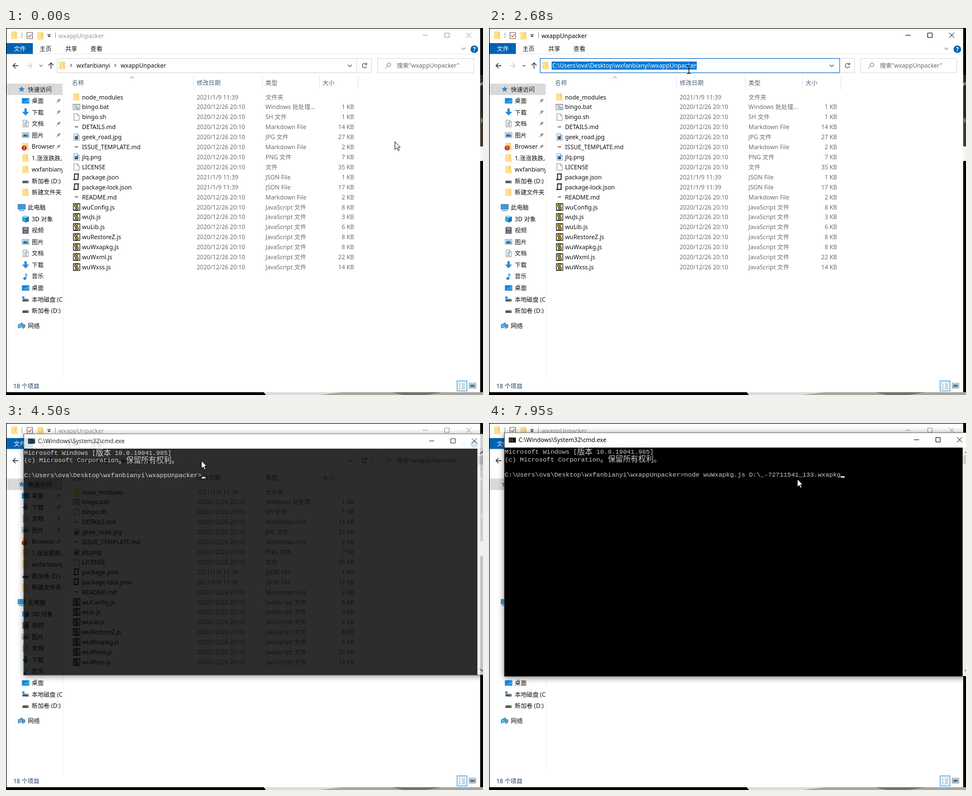
An HTML page that plays this animation: 853 px wide and 657 px high, repeating every 7.99 s.

```html
<!DOCTYPE html>
<html lang="zh-CN">
<head>
<meta charset="utf-8">
<title>wxappUnpacker</title>
<style>
  html, body { margin: 0; width: 100%; height: 100%; overflow: hidden; background: #000; }
  svg { display: block; }
  text { font: 10.65px "Noto Sans", "Noto Sans CJK SC", "Noto Sans CJK", sans-serif; }
  .con text { font: 11.38px "Liberation Mono", "Noto Sans CJK SC", monospace; }
  .con .wide { font: 13.66px "Noto Sans CJK SC", "Noto Sans CJK", sans-serif; }
  #shadow { filter: drop-shadow(0 2px 6px rgba(0, 0, 0, .55)); }
</style>
</head>
<body>
<svg id="stage" width="853" height="657" viewBox="0 0 853 657"></svg>
<script>
const LOOP = 7990;
const CELL = 6.83;
const INK = '#111', GREY = '#6d6d6d', BLUE = '#0063b1';
const HOME = String.raw`C:\Users\ova\Desktop\wxfanbianyi\wxappUnpacker`;
const SHELL = String.raw`C:\Windows\System32\cmd.exe`;
const COMMAND = String.raw`node wuWxapkg.js D:\_-72711541_133.wxapkg`;

// Markup helpers
const text = (x, y, s, fill = INK, more = '') => `<text x="${x}" y="${y}" fill="${fill}" ${more}>${s}</text>`;
const rect = (x, y, w, h, fill, more = '') => `<rect x="${x}" y="${y}" width="${w}" height="${h}" fill="${fill}" ${more}/>`;
const stroke = (d, color = '#555', w = 1) => `<path d="${d}" fill="none" stroke="${color}" stroke-width="${w}"/>`;
const fill = (d, color) => `<path d="${d}" fill="${color}"/>`;
const dot = (x, y, r, color) => `<circle cx="${x}" cy="${y}" r="${r}" fill="${color}"/>`;
const group = (id, body, more = '') => `<g id="${id}" ${more}>${body}</g>`;
const at = (x, y, body) => `<g transform="translate(${x} ${y})">${body}</g>`;
const controls = (x, y, gap, color) =>
  stroke(`M${x - 4.5} ${y}h9M${x + gap - 4} ${y - 4}h8v8h-8zM${x + 2 * gap - 4.5} ${y - 4.5}l9 9m0-9l-9 9`, color);

// Icons, each centred on 0,0
const page = fill('M-4.5-6.5h6.5l3 3v10h-9.5z', '#fff') + stroke('M-4.5-6h6l3.5 3.5v8.5h-9.5zM1.5-6v3.5h3.5', '#8a8a8a', .9);
const folder = rect(-5.5, -6.5, 10, 13, '#f3cf70') + fill('M-5.5-6.5h7v9h4.5v4h-11.5z', '#ffe08d');
const drive = rect(-5.5, 0, 11, 4, '#4b4f52') + fill('M-4-1.5h8l1.5 1.5h-11z', '#b9bdc0') + rect(2.5, 1.5, 2, 1, '#9fe07a');
const icons = {
  page, folder, drive,
  bat: rect(-6, -5, 12, 10, '#fff', 'stroke="#7b858d"') + rect(-6, -5, 12, 2, '#a6b4c0') +
    stroke('M-3 .5a2 2 0 1 0 4 0a2 2 0 1 0-4 0M1 2a1.6 1.6 0 1 0 3.2 0a1.6 1.6 0 1 0-3.2 0', '#7b858d', 1.1),
  md: rect(-3, -1.5, 6, 2.5, '#8d8d8d'),
  img: page + rect(-3, -2, 6, 6, '#3b79b5') + fill('M-3 4l3-3.5l3 3.5z', '#1c3f5c'),
  json: stroke('M-3.5 4V-5.5h8M3 -5.5V4.500M-6 4.500h7a2 2 0 0 0 2-2', '#222', 1.7),
  js: rect(-5.5, -6, 11.5, 12, '#fff', 'stroke="#111" stroke-width="1.2"') +
    stroke('M3-3.500C-1-6-4-2 0 0S1 5-3 3.500', '#111', 4) + stroke('M3-3.500C-1-6-4-2 0 0S1 5-3 3.500', '#f0d33c', 1.6),
  star: fill('M0-5.500l1.500 3.500 4 .3-3 2.600 1 4-3.500-2.200-3.500 2.200 1-4-3-2.600 4-.3z', '#2f86cf'),
  desk: rect(-6.5, -4.5, 13, 9, '#0f86dc') + fill('M-6.500 4.500L6.500-4.500V4.500z', '#31a4f1') + stroke('M-6.500 4.500h13', '#0b5a99'),
  down: fill('M-2-6.500h4v6h4.200L0 6.500L-6.200-.5H-2z', '#2b88d8'),
  doc: page + stroke('M-2.500-2h5M-2.500 0h5M-2.500 2h5M-2.500 4h5', '#5b86a8', .9),
  pic: rect(-6, -4.5, 12, 9, '#fff', 'stroke="#8a9aa6"') + rect(-4.5, -3, 9, 6, '#6fb3e0') + fill('M-4.500 3v-2l3-2l3 2l3-1v3z', '#2f5f86'),
  alert: folder + dot(-2.5, 2.5, 4.5, '#c42b1c') + rect(-3.1, -.5, 1.2, 3.6, '#fff') + rect(-3.1, 4, 1.2, 1.2, '#fff'),
  pc: rect(-6.5, -5.5, 13, 8.5, '#2f9de4', 'stroke="#5d7486" stroke-width=".9"') + stroke('M-5 5.500h10', '#3f7fb0', 1.3),
  cube: fill('M-6-4l5-2 7 2v8l-6 2.500-6-2.500z', '#31a6d8') + fill('M0-2l6-2v8L0 6.500z', '#1c78ab') + fill('M-6-4l5-2 7 2L0-2z', '#8fd8f2'),
  film: rect(-5.5, -6, 11, 12, '#39414a') + rect(-3, -5, 6, 4.5, '#7aa7d8') + rect(-3, .7, 6, 4.5, '#95846e') +
    stroke('M-4.300-5.500V6M4.300-5.500V6', '#ddd', '1" stroke-dasharray="1.3 1.3'),
  note: fill('M0-6.500c1 3 5 3.500 3.500 7.500c0-3-1.500-3.500-2.200-3.500V4a2.700 2.300 0 1 1-1.300-2z', '#1683d8'),
  sys: drive + rect(-6, -5, 4, 4, '#1591e0'),
  net: fill('M-6.500-2l8-4v8l-8 3z', '#2288cc') + fill('M1-4l5.500 2v5L1 6z', '#6a8fad') + fill('M-5-1l5-2.300v4.500l-5 2z', '#65bdf0'),
  pin: fill('M1-4l3 3-1.500.5-1.500 2 0 2-4.500-4.500 2 0 2-1.500z', '#8b9299') + stroke('M-1.500 1.500l-3 3', '#8b9299'),
};
const icon = (name, x, y) => at(x, y, icons[name]);

// Files: icon, name, type, size in KB, is recent
const MD = 'Markdown File', JS = 'JavaScript 文件';
const files = [
  ['folder', 'node_modules', '文件夹', 0, 1], ['bat', 'bingo.bat', 'Windows 批处理...', 1],
  ['page', 'bingo.sh', 'SH 文件', 1], ['md', 'DETAILS.md', MD, 14],
  ['img', 'geek_road.jpg', 'JPG 文件', 27], ['md', 'ISSUE_TEMPLATE.md', MD, 2],
  ['img', 'jlq.png', 'PNG 文件', 7], ['page', 'LICENSE', '文件', 35],
  ['json', 'package.json', 'JSON File', 1, 1], ['json', 'package-lock.json', 'JSON File', 17, 1],
  ['md', 'README.md', MD, 2],
  ...[['Config', 8], ['Js', 3], ['Lib', 6], ['RestoreZ', 8], ['Wxapkg', 8], ['Wxml', 22], ['Wxss', 14]]
    .map(([n, kb]) => ['js', `wu${n}.js`, JS, kb]),
];
const fileRow = ([kind, name, type, kb, recent], i) => {
  const y = 123.5 + i * 17.91, base = y + 4;
  return icon(kind, 126, y) + text(136, base, name) +
    text(341, base, recent ? '2021/1/9 11:39' : '2020/12/26 20:10', GREY) + text(464, base, type, GREY) +
    (kb ? text(622.5, base, kb + ' KB', GREY, 'text-anchor="end"') : '');
};

// Sidebar: blocks of a first row's y and its entries; the first entry is the parent
const places = [
  [109.5, 'star 快速访问|desk 桌面|down 下载|doc 文档|pic 图片|alert Browser|folder 1.涨涨跌跌,|folder wxfanbianyi|drive 新加卷 (D:)|folder 新建文件夹'],
  [321.3, 'pc 此电脑|cube 3D 对象|film 视频|pic 图片|doc 文档|down 下载|note 音乐|desk 桌面|sys 本地磁盘 (C:)|drive 新加卷 (D:)'],
  [533, 'net 网络'],
];
const sidebar = places.map(([top, list], b) => list.split('|').map((entry, i) => {
  const [, kind, label] = entry.match(/^(\w+) (.+)$/);
  const y = top + i * 20.53;
  return icon(kind, i ? 35 : 28, y) + text(i ? 46 : 39, y + 4, label) +
    (!b && i > 0 && i < 6 ? icon('pin', 94, y) : '');
}).join('')).join('');

const desktop = rect(0, 0, 853, 657, '#000') +
  rect(848, 84, 5, 76, '#262626') + rect(848, 160, 5, 52, '#40382f') + rect(848, 212, 5, 26, '#f4f4f4') +
  text(847, 103, 'w', '#ddd') + text(849, 169, 'ir', '#ddd') +
  fill('M461 652H853V657H465z', '#aaa59f') + fill('M461 652H600L560 657H465z', '#dedcd8') + fill('M690 652h90l-30 5h-40z', '#77726c');

const chevron = (x, y, color = '#555', s = 3.5) => stroke(`M${x - s} ${y - s / 2}l${s} ${s}l${s}-${s}`, color, 1.2);
const bar = (color) => rect(91.5, 54.5, 535.5, 25.5, '#fff', `stroke="${color}"`);

const explorer = rect(1, 1, 847, 651, '#fff') +
  icon('folder', 15, 13) + stroke('M28.500 8v10M88.500 8v10', '#999') +
  rect(37.5, 8, 10, 11, '#fff', 'stroke="#666"') + stroke('M39.500 13.500l2.500 2.500l4-5', '#d0582c', 1.3) +
  icon('folder', 62, 14) + stroke('M74 11.500h6', '#222') + fill('M74 13.500h6l-3 3z', '#222') +
  group('caption', text(94, 17.5, 'wxappUnpacker', 'currentColor') + controls(749.5, 13, 39, 'currentColor')) +
  rect(1, 27, 47, 19.5, BLUE) + text(14, 41, '文件', '#fff') +
  text(60, 41, '主页') + text(106, 41, '共享') + text(151, 41, '查看') +
  stroke('M48 46.500H848', '#e8e8e8') + chevron(818, 37, '#999') +
  dot(837.5, 38, 6.8, BLUE) + text(837.5, 42, '?', '#fff', 'text-anchor="middle" font-weight="bold" style="font-weight:700"') +
  stroke('M22 67.500H12.500M17 63l-4.500 4.500l4.500 4.500', '#333', 1.3) +
  stroke('M37 67.500h9.500M42 63l4.500 4.500l-4.500 4.500', '#d0d0d0', 1.3) + chevron(62.5, 67.5, '#666', 2.5) +
  stroke('M80.500 73V62.500M76 67l4.500-4.500l4.500 4.500', '#333', 1.3) +
  rect(91.5, 54.5, 562, 25.5, '#fff', 'stroke="#d9d9d9"') +
  group('crumbs', bar('#d9d9d9') +
    group('hoverParent', rect(121.5, 55, 68, 24, '#e5f3ff', 'stroke="#cce8ff"')) +
    group('hoverHere', rect(202.5, 55, 87, 24, '#e5f3ff', 'stroke="#cce8ff"')) +
    stroke('M115 64.500l2.500 2.500l-2.500 2.500M194 64.500l2.500 2.500l-2.500 2.500', '#555', 1.1) +
    text(126, 70.5, 'wxfanbianyi') + text(205, 70.5, 'wxappUnpacker') + chevron(615, 67.5)) +
  group('edit', bar('#0067c0') + '<rect id="pick" x="112" y="60" height="14.5" fill="#0078d7"/>' +
    text(113, 71, '', INK, 'id="typed"') + '<rect id="caret" y="60.5" width="1" height="13.5"/>' + chevron(613, 67.5)) +
  icon('folder', 101, 67) +
  group('reload', stroke('M644.500 65a4 4 0 1 0 .5 3.500M645 62v3.500h-3.500', '#555', 1.2)) +
  group('go', stroke('M636.500 67.500h9M642 63.500l4 4l-4 4', '#444', 1.2)) +
  rect(664.5, 54.5, 172, 25.5, '#fff', 'stroke="#d9d9d9"') +
  stroke('M681.500 66a3.300 3.300 0 1 0 6.600 0a3.300 3.300 0 1 0-6.600 0M682.300 68.500l-4.300 4', '#777') +
  text(699, 71, '搜索"wxappUnpacker"', '#666') +
  stroke('M102.500 86V630', '#f3f3f3') + stroke('M335.500 86v24M458.500 86v24M560.500 86v24M629.500 86v24', '#e5e5e5') +
  stroke('M221.500 90l3.500-3l3.500 3', '#777') +
  [[118, '名称'], [341, '修改日期'], [464, '类型'], [566, '大小']].map(([x, s]) => text(x, 102, s, '#4c607a')).join('') +
  files.map(fileRow).join('') +
  rect(1, 99.5, 100, 20.5, '#d9d9d9') +
  `<clipPath id="nav"><path d="M0 90h101v460H0z"/></clipPath><g clip-path="url(#nav)">${sidebar}</g>` +
  text(13, 645, '18 个项目', '#1e395b') +
  rect(806.5, 631.5, 18, 18.5, '#cce8ff', 'stroke="#4ea6dc"') + rect(809, 635, 13, 11.5, '#fff') +
  stroke('M810 637.500h3M810 641h3M810 644.500h3M815 637.500h6M815 641h6M815 644.500h6', '#777', 1.1) +
  rect(828.5, 636, 11.5, 8.5, '#fff', 'stroke="#777"') + rect(830, 638, 8.5, 5, '#4d80a8');

const col = (n) => 28 + n * CELL;
const PROMPT_END = col(HOME.length + 1);
const con = (x, y, s, more) => text(x, y, s, '#ccc', more);
const consoleWindow = rect(27.5, 17, 838, 436.5, '#000', 'id="shadow"') +
  rect(28, 17.5, 837, 26.5, '#fff') + stroke('M27.500 17V453.500H847', '#3a3a3a', .8) +
  rect(35.5, 25, 12.5, 10, '#111') + rect(35.5, 25, 12.5, 1.5, '#bbb') +
  '<text x="37" y="32.500" fill="#fff" style="font-size:5px">C:\\</text>' +
  text(53, 34, SHELL, '#000') + controls(764.5, 30, 38.5, '#000') +
  rect(847, 44, 18, 409, '#f0f0f0') + rect(848, 58, 16, 15, '#cdcdcd') +
  stroke('M851.500 53.500l4-4l4 4', '#444', 1.4) + chevron(855, 444, '#444', 4) +
  group('output',
    con(28, 55, 'Microsoft Windows [') + con(col(19), 56, '版本', 'class="wide"') + con(col(24), 55, '10.0.19041.985]') +
    con(28, 68.6, '(c) Microsoft Corporation') + con(col(25), 69.4, '。保留所有权利。', 'class="wide"') +
    con(28, 96, HOME + '&gt;') + group('command', con(PROMPT_END, 96, COMMAND)), 'class="con"') +
  group('blink', rect(0, 0, CELL, 2.6, '#eee'));

const pointer = group('pointer',
  group('arrow', '<path d="M.5.500V14.500L3.700 11.500L6 16.500L8.200 15.500L6 10.600H10z" fill="#fff" stroke="#000" stroke-width=".9"/>') +
  group('beam', stroke('M5 .5h2.500l1 .8l1-.8H12M8.500 1V14M5 14.500h2.500l1-.8l1 .8H12', '#000', 1.2)));

stage.innerHTML = desktop + explorer + group('shell', consoleWindow) + pointer;

// Timelines
const path = [
  [0, 695, 203], [240, 695, 203], [1010, 612, 166], [1300, 165, 72], [1540, 312, 67], [1780, 349, 67],
  [4620, 349, 67], [5350, 389, 146], [6200, 389, 146], [6600, 430, 54], [6970, 356, 74],
  [7260, 443, 100], [7460, 443, 100], [7950, 551, 100],
];
const zoom = [[4340, .95, 0], [4420, .975, .51], [4500, .99, .82], [4620, 1, 1]];
// time, text, selected, edited
const edits = [
  [0, ''], [1990, HOME, 1, 0], [3160, 'c', 0, 1], [3360, 'cm', 0, 1], [3530, 'cmd', 0, 1],
  [3850, 'cmd', 1, 1], [4140, SHELL, 0, 1], [4460, ''],
];
const blinks = [[4380, 5040], [5840, 6340], [6880, 7460], [7930, LOOP]];

const $ = (id) => document.getElementById(id);
const show = (id, on) => $(id).setAttribute('display', on ? 'inline' : 'none');
const within = (t, a, b) => t >= a && t < b;

function sample(keys, t) {
  const i = keys.findIndex((k) => k[0] > t);
  if (i < 0) return keys[keys.length - 1].slice(1);
  if (i === 0) return keys[0].slice(1);
  const a = keys[i - 1], b = keys[i], p = (t - a[0]) / (b[0] - a[0]);
  return a.slice(1).map((v, n) => v + (b[n + 1] - v) * p);
}

function drawAddress(t) {
  const [, value, selected, edited] = edits.filter((e) => e[0] <= t).pop();
  const editing = value !== '';
  show('crumbs', !editing);
  show('edit', editing);
  show('go', edited);
  show('reload', !edited);
  show('hoverParent', within(t, 1240, 1360));
  show('hoverHere', within(t, 1360, 1580));
  if (!editing) return;
  const typed = $('typed');
  typed.textContent = value;
  typed.setAttribute('fill', selected ? '#fff' : INK);
  const width = typed.getComputedTextLength();
  $('pick').setAttribute('width', selected ? width + 1.5 : 0);
  $('caret').setAttribute('x', value === SHELL ? 112 : 113.5 + width);
  show('caret', !selected);
}

function drawShell(t) {
  const [scale, alpha] = sample(zoom, t);
  const ready = t >= 4440, pasted = t >= 5840;
  show('shell', alpha > 0);
  $('shell').setAttribute('opacity', alpha);
  $('shell').setAttribute('transform', `translate(446 235) scale(${scale}) translate(-446 -235)`);
  show('output', ready);
  show('command', pasted);
  show('blink', blinks.some(([a, b]) => within(t, a, b)));
  const x = pasted ? PROMPT_END + COMMAND.length * CELL : ready ? PROMPT_END : 28;
  $('blink').setAttribute('transform', `translate(${x} ${ready ? 95.2 : 53.5})`);
}

function draw(t) {
  $('caption').setAttribute('color', within(t, 1990, 4360) ? '#000' : '#999');
  drawAddress(t);
  drawShell(t);
  const [x, y] = sample(path, t);
  const beam = within(t, 1990, 4060);
  $('pointer').setAttribute('transform', `translate(${x} ${y})`);
  show('beam', beam);
  show('arrow', !beam);
}

const start = performance.now();
function tick() {
  draw((performance.now() - start) % LOOP);
  requestAnimationFrame(tick);
}
tick();
</script>
</body>
</html>
```
